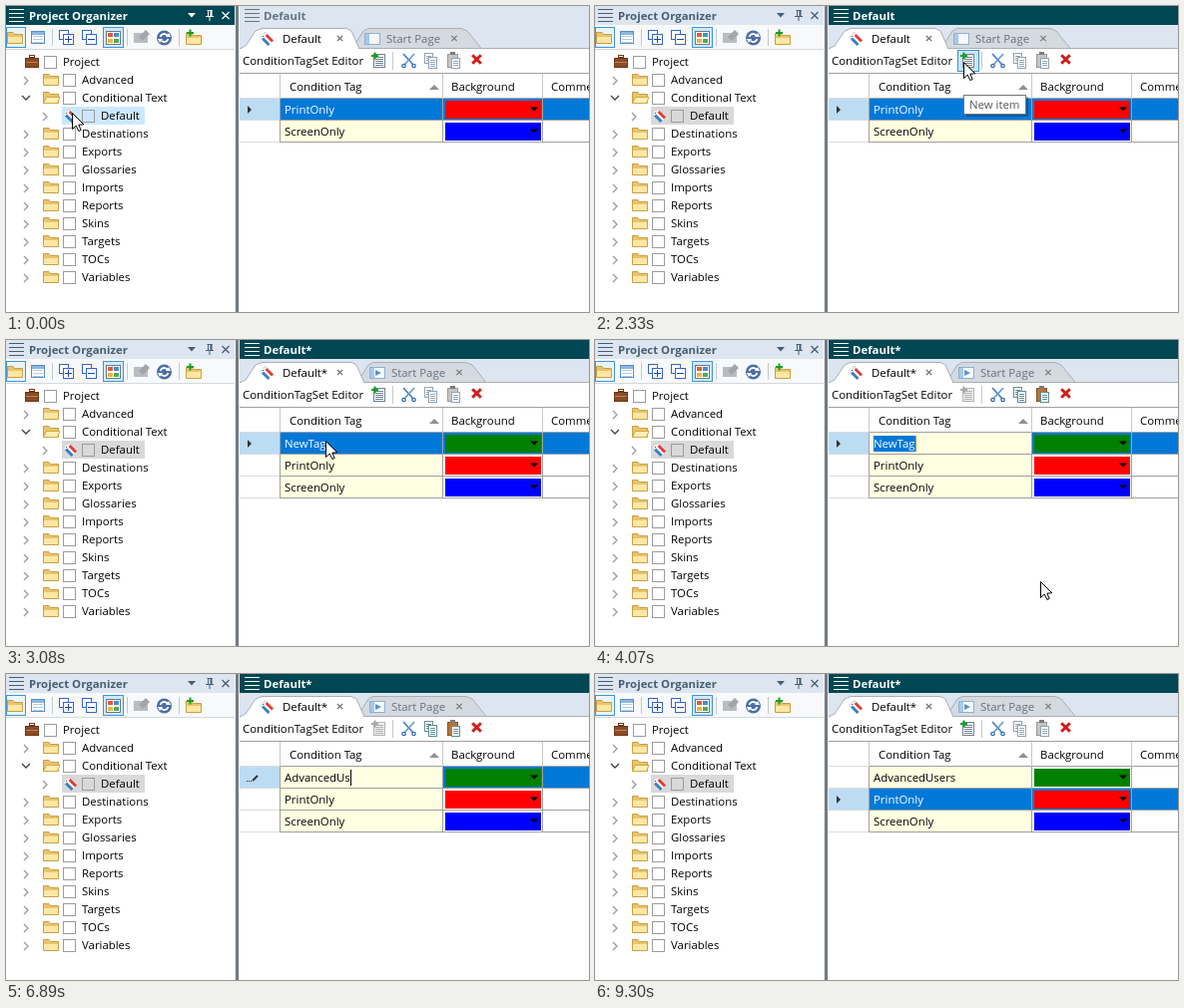
An HTML page with a canvas for the animation above (9570 ms loop, 584 by 307 pixels).

```html
<!DOCTYPE html>
<html lang="en">
<head>
<meta charset="utf-8">
<title>Condition tag editor</title>
<style>
html, body { margin: 0; width: 100%; height: 100%; overflow: hidden; background: #fff; }
canvas { display: block; }
</style>
</head>
<body>
<canvas id="stage" width="584" height="307"></canvas>
<script>
const g = document.getElementById('stage').getContext('2d');
const LOOP = 9570;
const FACE = '"Open Sans", "Noto Sans", sans-serif';
const BLUE = '#0078d7', TEAL = '#004653', PALE = '#dde6f0', CREAM = '#ffffe1';
const LINE = '#a0a0a0', SOFT = '#dcdcdc';
const COLUMNS = [274, 437, 537];

// Pointer positions, each held until the next; no coordinates means hidden.
const POINTER = [
  [0, 67, 108], [750, 70, 113], [870, 112, 112], [990, 180, 104], [1110, 238, 96],
  [1230, 262, 93], [1480, 277, 103], [1600, 291, 98], [1720, 326, 82], [1840, 357, 66],
  [1960, 369, 58], [2080, 370, 57], [2840, 361, 66], [2960, 336, 90], [3080, 321, 102],
  [3950, 385, 175], [4070, 447, 243], [4470], [7790, 447, 243], [8670, 461, 253],
  [8790, 476, 263], [8940, 486, 272], [9060, 510, 284], [9180, 536, 297], [9300]
];
// One time per typed character.
const KEYS = [4470, 4740, 4990, 5110, 5620, 5870, 6120, 6400, 6770, 6890, 7140, 7140, 7420];
const TYPED = 'AdvancedUsers';

function box(x, y, w, h, fill, edge) {
  if (fill) { g.fillStyle = fill; g.fillRect(x, y, w, h); }
  if (edge) { g.strokeStyle = edge; g.lineWidth = 1; g.strokeRect(x + .5, y + .5, w - 1, h - 1); }
}

function trace(pts, closed) {
  g.beginPath();
  for (let i = 0; i < pts.length; i += 2) g.lineTo(pts[i], pts[i + 1]);
  if (closed) g.closePath();
}

function poly(pts, fill, edge) {
  trace(pts, true);
  if (fill) { g.fillStyle = fill; g.fill(); }
  if (edge) { g.strokeStyle = edge; g.lineWidth = 1; g.stroke(); }
}

function path(pts, color, width = 1) {
  trace(pts, false);
  g.strokeStyle = color;
  g.lineWidth = width;
  g.stroke();
}

function arc(x, y, r, from, to, color, width) {
  g.beginPath();
  g.arc(x, y, r, from, to);
  g.strokeStyle = color;
  g.lineWidth = width;
  g.stroke();
}

function text(s, x, y, color = '#000', weight = '') {
  g.font = weight + ' 11.4px ' + FACE;
  g.fillStyle = color;
  g.fillText(s, x, y);
  return g.measureText(s).width;
}

function cross(x, y, r, color, width) {
  path([x - r, y - r, x + r, y + r], color, width);
  path([x + r, y - r, x - r, y + r], color, width);
}

function plus(x, y, color = '#16a020') {
  box(x - 3, y - 1, 7, 2, color);
  box(x - .5, y - 3.5, 2, 7, color);
}

function folder(x, y, open) {
  poly([x + .5, y + 12.5, x + .5, y + 1.5, x + 6, y + 1.5, x + 7.5, y + 3.5,
    x + 15.5, y + 3.5, x + 15.5, y + 12.5], '#e9c46c', '#c99f45');
  if (open) poly([x + .5, y + 12.5, x + 3.5, y + 6.5, x + 17, y + 6.5, x + 14.5, y + 12.5], '#fff0b8', '#d7a63f');
  else box(x + 1, y + 6, 14, 6, '#fde7a4');
}

function tag(x, y) {
  g.save();
  g.translate(x, y);
  g.rotate(Math.PI / 4);
  box(-6, -4, 12, 3, '#e23b35');
  box(-6, -1, 12, 2, '#fff');
  box(-6, 1, 12, 3, '#397fc4');
  box(-6, -4, 3, 8, '#e8edf2');
  g.restore();
  box(x - 4, y - 3, 1, 1, '#555');
}

function page(x, y, w, h, edge, fill = '#fff') {
  box(x, y, w, h, fill, edge);
  for (let i = 3; i < h - 2; i += 2) box(x + 2, y + i, w - 4, 1, edge);
}

function checkbox(x, y, fill = '#fff') { box(x, y, 13, 13, fill, '#9b9b9b'); }

function title(x, w, s, active, ink) {
  box(x, 0, w, 19, active ? TEAL : PALE);
  for (let i = 0; i < 4; i++) box(x + (x ? 5 : 3), 3 + i * 4, 15, 1, ink);
  text(s, x + 24 - (x ? 0 : 1), 14, ink, 'bold');
}

function leftTitle(active) {
  const ink = active ? '#fff' : '#465d73';
  title(0, 229, 'Project Organizer', active, ink);
  poly([182, 7, 190, 7, 186, 11.5], ink);
  path([201.5, 4.5, 206.5, 4.5], ink);
  path([202.5, 4, 202.5, 10], ink);
  path([205.5, 4, 205.5, 10], ink, 2);
  path([200, 10.5, 208, 10.5], ink);
  path([204, 11, 204, 15], ink);
  cross(220, 9.5, 3.5, ink, 1.3);
}

function leftTools() {
  box(0, 19, 229, 25, '#f8f9fb');
  box(0, 43, 229, 1, '#d6d9dc');
  box(0, 21, 20, 21, '#eaf4fc', '#3d96dc');
  folder(1, 25);
  box(25, 25, 14, 13, '#fff', '#5a8fc8');
  box(26, 26, 12, 3, '#8cb6e2');
  for (let i = 0; i < 3; i++) box(27, 30 + i * 3, 10, 1, '#b4cce6');
  for (const x of [46, 121, 173]) box(x, 23, 1, 17, '#c3c7cb');
  for (const x of [53, 76]) {
    box(x, 24, 10, 10, '#fff', '#3464d0');
    box(x + 4, 28, 11, 11, '#fff', '#3464d0');
    box(x + 6, 33, 7, 1, '#20489c');
    if (x === 53) box(62, 30, 1, 7, '#20489c');
  }
  box(97, 21, 21, 21, '#d3e8fa', '#3d96dc');
  box(100, 25, 15, 14, '#fff', '#6b7886');
  ['#e25c3b', '#458ed5', '#f0b53a', '#4eaa55'].forEach((c, i) =>
    box(102 + i % 2 * 6, 27 + (i >> 1) * 6, 5, 4, c));
  box(128, 27, 14, 10, '#b9bcc0');
  poly([133, 31, 140, 24, 144, 28, 137, 35], '#a2a6aa');
  g.beginPath();
  g.arc(158.5, 32, 7.5, 0, 7);
  g.fillStyle = '#4c6ea8';
  g.fill();
  arc(158.5, 32, 4, -2.9, -.4, '#fff', 1.8);
  arc(158.5, 32, 4, .25, 2.75, '#fff', 1.8);
  poly([160, 31, 165, 31, 163, 27], '#fff');
  poly([152, 33, 157, 33, 154, 37], '#fff');
  folder(180, 26);
  plus(184, 27);
}

function chevron(x, y, open) {
  path(open ? [x - 4, y - 2, x, y + 2, x + 4, y - 2] : [x - 2, y - 4, x + 2, y, x - 2, y + 4],
    open ? '#404040' : '#9a9a9a', 1.3);
}

function tree(active) {
  box(19, 52, 14, 10, '#8a4b25', '#6d3517');
  box(23, 49, 6, 3, null, '#6d3517');
  box(20, 56, 12, 1, '#c08455');
  checkbox(38, 50);
  text('Project', 57, 60);
  const names = ['Advanced', 'Conditional Text', 'Default', 'Destinations', 'Exports', 'Glossaries',
    'Imports', 'Reports', 'Skins', 'Targets', 'TOCs', 'Variables'];
  names.forEach((name, i) => {
    const y = 74 + i * 18;
    if (name === 'Default') {
      const fill = active ? '#cce8ff' : '#d9d9d9';
      box(56, y - 9, 83, 18, fill);
      chevron(39, y + 1);
      tag(64, y);
      checkbox(76, y - 6, fill);
      text(name, 95, y + 4);
    } else {
      const open = i === 1;
      chevron(20, y + (open ? 0 : 1), open);
      folder(37, y - 7, open);
      checkbox(57, y - 6);
      text(name, 76, y + 4);
    }
  });
}

function tabs(name, shift) {
  box(234, 19, 350, 24, PALE);
  const e = 349 + shift, edge = '#a9afb5';
  poly([e - 2, 42.5, e + 9, 25, e + 14, 22.5, e + 107, 22.5, e + 113, 25, e + 127, 42.5], '#d5dae0', edge);
  box(234, 42, 350, 1, edge);
  poly([234, 43, 240, 40, 250, 25, 256, 22.5, e - 8, 22.5, e - 3, 25, e + 5, 43], '#fff', edge);
  box(236, 42, e - 232, 1, '#fff');
  tag(261, 33);
  text(name, 277, 37);
  cross(334.5, 32.5, 2.7, '#666', 1.2);
  box(359 + shift, 27, 16, 12, '#f5f9fc', '#8fb0cf');
  box(360 + shift, 28, 4, 10, '#a4c9eb');
  if (shift > 2) poly([365 + shift, 30, 371 + shift, 33, 365 + shift, 36], '#5b94c8');
  text('Start Page', 381 + shift, 37, '#65707a');
  cross(449 + shift, 32.5, 2.7, '#777', 1.2);
}

function rightTools(editing, hover) {
  box(234, 43, 350, 25, '#fff');
  text('ConditionTagSet Editor', 237, 59);
  if (hover) box(363, 44, 22, 22, '#cce4f7', '#3c91d2');
  page(368, 48, 12, 14, editing ? '#b4b4b4' : '#708090', editing ? '#eee' : '#fff');
  plus(369, 50, editing ? '#a9a9a9' : '#16a020');
  box(387, 46, 1, 18, '#c8c8c8');

  path([398, 48, 408, 59], '#477fc0', 1.7);
  path([409, 48, 399, 59], '#6a9bd0', 1.7);
  for (const x of [398.5, 408.5]) arc(x, 60, 1.7, 0, 7, '#326cb4', 1.3);
  const edge = editing ? '#5f8f96' : '#92a3b3';
  page(419, 47, 9, 11, edge);
  page(423, 51, 9, 12, edge);
  box(442, 48, 11, 14, editing ? '#b5743a' : '#c6c6c6', editing ? '#8a5425' : '#999');
  box(445, 46, 5, 3, '#7b7b7b');
  page(446, 52, 9, 11, edge);
  cross(471.5, 53.5, 4.3, '#d01c1c', 3);
}

function header() {
  box(234, 68, 350, 25, '#fff');
  box(234, 67, 350, 1, LINE);
  box(234, 92, 40, 1, SOFT);
  box(274, 92, 310, 1, LINE);
  for (const x of COLUMNS) box(x, 68, 1, 25, '#c8c8c8');
  text('Condition Tag', 284, 85);
  text('Background', 446, 85);
  text('Comments', 546, 85);
  poly([424, 84, 434, 84, 429, 79], '#909090');
}

function row(i, name, color, selected, edit) {
  const y = 93 + i * 22;
  const cell = selected ? BLUE : '#fff';
  box(234, y, 40, 22, selected ? '#bcdcf4' : '#fff');
  box(275, y, 162, 22, selected && !edit ? BLUE : CREAM);
  box(438, y, 146, 22, cell);
  box(440, y + 2, 96, 18, color);
  poly([525, y + 8.5, 533, y + 8.5, 529, y + 12.5], '#000');
  if (edit && edit.pencil) {
    for (let k = 0; k < 3; k++) box(241 + k * 2, y + 14, 1, 1, '#222');
    path([247, y + 14, 252, y + 9], '#333', 2);
  } else if (selected) {
    poly([242, y + 7, 246, y + 11, 242, y + 15], '#333');
  }
  const marked = edit && edit.marked;
  if (marked) {
    g.font = '11.4px ' + FACE;
    box(279, y + 3, g.measureText(name).width + 1, 16, BLUE);
  }
  const w = text(name, 279, y + 15, selected && (!edit || marked) ? '#fff' : '#000');
  if (edit) box(Math.round(279 + w), y + 3, 1, 16, marked ? '#ff8728' : '#000');
  box(234, y + 21, 40, 1, SOFT);
  box(274, y + 21, 310, 1, LINE);
  for (const x of COLUMNS) box(x, y, 1, 22, LINE);
}

function pointer(t) {
  const [, x, y] = POINTER.filter(p => p[0] <= t).pop();
  if (x === undefined) return;
  g.save();
  g.translate(x - .5, y - .5);
  poly([0, 0, 0, 16, 3.7, 12.6, 6.3, 18, 8.7, 17, 6.3, 11.7, 11.3, 11.3], '#fff', '#000');
  g.restore();
}

function tooltip() {
  box(372, 91, 62, 20, 'rgba(0,0,0,.25)');
  box(369, 89, 63, 20, '#fff', '#767676');
  text('New item', 375, 103, '#575757');
}

function draw(t) {
  const active = t < 2330;
  const dirty = t >= 2450;
  const name = dirty ? 'Default*' : 'Default';
  const shift = !dirty ? 0 : t < 2840 ? 2 : 5;
  const count = KEYS.filter(k => k <= t).length;

  box(0, 0, 584, 307, '#fff');
  leftTitle(active);
  leftTools();
  tree(active);
  box(229, 0, 5, 307, '#eef1f4');
  box(230, 0, 3, 307, '#747b82');
  title(234, 350, name, !active, active ? '#637485' : '#fff');
  tabs(name, shift);
  rightTools(t >= 3700 && t < 7910, t >= 1960 && t < 2840);
  header();

  if (dirty) {
    const done = t >= 7790;
    const edit = t >= 3580 && !done ? { marked: !count, pencil: t >= 4590 } : null;
    row(0, count ? TYPED.slice(0, count) : 'NewTag', '#008000', !done, edit);
    row(1, 'PrintOnly', '#f00', done);
    row(2, 'ScreenOnly', '#00f', false);
  } else {
    row(0, 'PrintOnly', '#f00', true);
    row(1, 'ScreenOnly', '#00f', false);
  }
  if (t >= 2080 && t < 2840) tooltip();
  pointer(t);
}

const start = performance.now();
function tick() {
  draw((performance.now() - start) % LOOP);
  requestAnimationFrame(tick);
}
tick();
</script>
</body>
</html>
```
